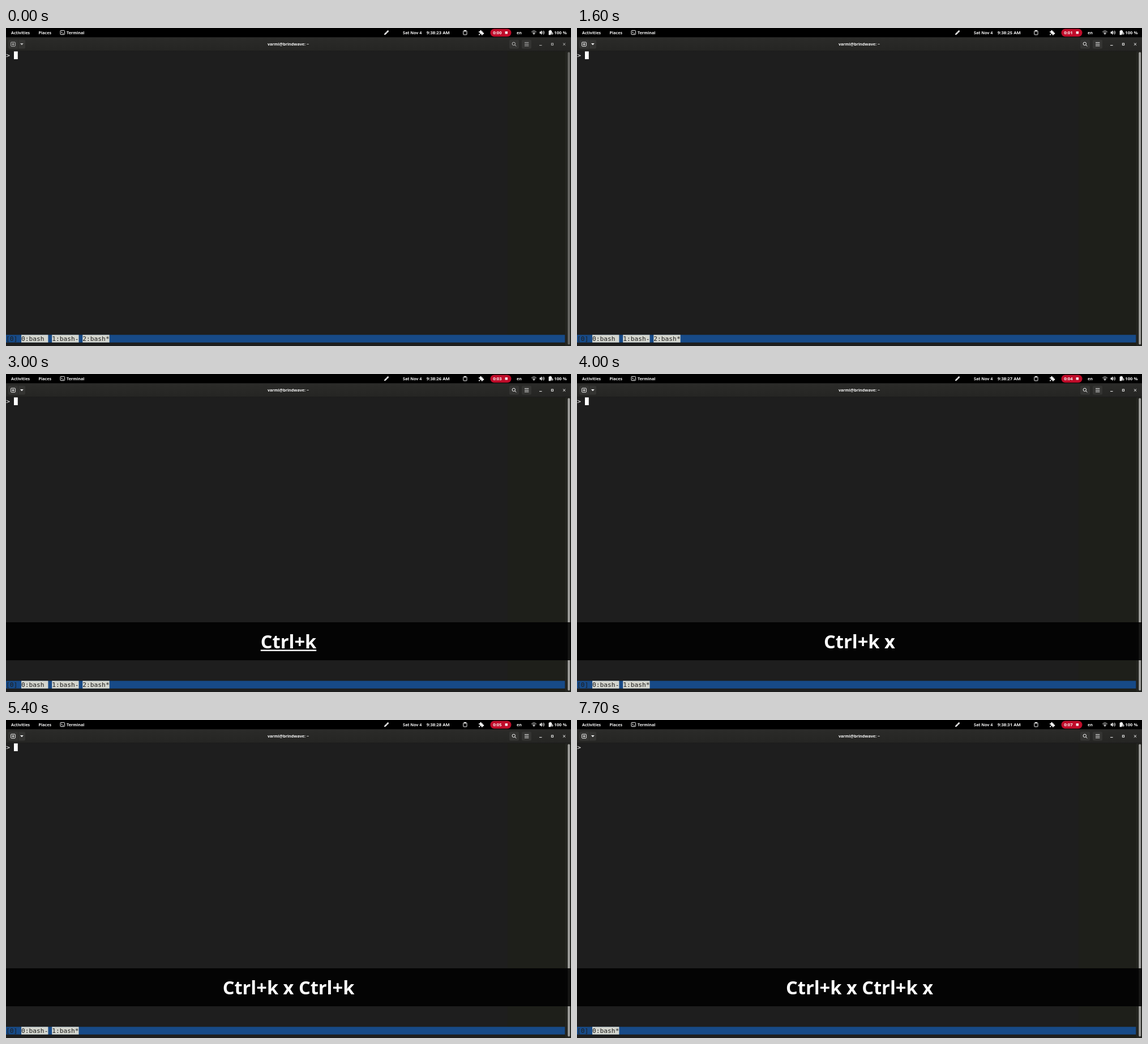
An HTML page that plays this animation: 998x561 px, repeating every 7900 ms.

```html
<!DOCTYPE html>
<html lang="en">
<head>
<meta charset="utf-8">
<title>Terminal session</title>
<style>
  html, body { margin: 0; width: 100%; height: 100%; overflow: hidden; background: #1e1e1e; }
  svg { display: block; width: 998px; height: 561px; }
  text { white-space: pre; }
  .ui { font: 600 7.15px "Noto Sans", "Open Sans", sans-serif; fill: #f4f4f4; }
  .digits { font-size: 7.7px; }
  .mono { font: 11.24px "DejaVu Sans Mono", monospace; }
  .keys { font: 700 32.6px "Noto Sans", "Open Sans", sans-serif; fill: #fff; text-anchor: middle; }
  .line { fill: none; stroke: #f4f4f4; stroke-width: 1; }
  .solid { fill: #f4f4f4; }
</style>
</head>
<body>
<svg viewBox="0 0 998 561">
  <defs>
    <linearGradient id="headerFill" x2="0" y2="1">
      <stop stop-color="#2b2b29"/><stop offset="1" stop-color="#252523"/>
    </linearGradient>
  </defs>

  <!-- Terminal body -->
  <rect width="998" height="561" fill="#1e1e1e"/>
  <rect x="886" y="41" width="112" height="520" fill="#1e1f1a"/>
  <rect x="988" y="41" width="10" height="520" fill="#242521"/>
  <rect id="thumb" x="992.3" y="42.5" width="3.8" height="516" rx="1.9"/>
  <text class="mono" x="0.3" y="52" fill="#fff">&gt;</text>
  <rect id="cursor" x="14" y="41.3" width="6.8" height="13.7" fill="#fff"/>

  <!-- Status line -->
  <rect y="541.3" width="987.3" height="13.5" fill="#174a87"/>
  <text class="mono" x="0" y="552" fill="#1e1e1e">[0]</text>
  <g id="windows"></g>

  <!-- Top panel -->
  <rect width="998" height="16.5"/>
  <g class="ui">
    <text x="9" y="10.6">Activities</text>
    <text x="57.6" y="10.6">Places</text>
    <text x="107" y="10.6">Terminal</text>
    <text x="701" y="10.6">Sat Nov 4</text>
    <text id="clock" class="digits" x="742.8" y="10.8"></text>
    <text x="902" y="10.6">en</text>
    <text class="digits" x="968.3" y="10.8">100 %</text>
  </g>
  <rect x="96" y="4.4" width="7.6" height="7.2" rx="1" class="line"/>
  <path class="line" stroke-width=".8" d="M97.7 6.4l1.5 1.4-1.5 1.4M100 9.7h2"/>
  <path class="line" stroke-width="1.4" d="M668.6 11.7l.5-1.6 3-3M672 6l2.3 2.3"/>
  <path class="solid" d="M671.8 6.5l1.9-1.9q1.2-.9 2 0t0 2l-1.9 1.9zM668 12.2l.8-2.5 2.8-2.8 1.8 1.8-2.8 2.8z"/>
  <rect class="line" x="807.8" y="5" width="6.2" height="6.9" rx=".8"/>
  <rect class="solid" x="809.2" y="3.7" width="3.4" height="2.6" rx=".6"/>
  <path class="solid" d="M835 6h2.2a1.5 1.5 0 1 1 2.8 0H842v2.2a1.5 1.5 0 1 1 0 2.6V12.4h-2.4a1.4 1.4 0 1 0-2.4 0H835v-2a1.5 1.5 0 1 0 0-2.5z"/>
  <rect x="855.5" y="1.6" width="37" height="13.6" rx="6.8" fill="#c00c2a"/>
  <text id="timer" class="ui digits" x="860.2" y="10.8"></text>
  <rect class="solid" x="881.6" y="6" width="4.4" height="4.4"/>
  <path class="line" d="M928.3 7q4.2-3.8 8.4 0M929.8 8.8q2.7-2.4 5.4 0"/>
  <path class="solid" d="M930.8 9.7q1.7-1.4 3.4 0l-1.7 2z"/>
  <path class="solid" d="M942.6 6.6h1.8l2.2-2.3v7.6l-2.2-2.2h-1.8z"/>
  <path class="line" d="M947.9 6.2q1.3 1.9 0 3.8M949.5 4.7q2.5 3.4 0 6.8"/>
  <path class="solid" d="M958.6 4.8h1.5V3.7h2.6v1.1h1.5V8l-1.8 2v2.2h-3.8z"/>
  <path class="line" d="M963 9.2h3v1.4q-1.5 1.5-3 0zM963.7 9V7.6M965.3 9V7.6"/>

  <!-- Window header -->
  <rect y="16.5" width="998" height="24.5" fill="url(#headerFill)"/>
  <rect y="40.2" width="998" height=".8" fill="#1a1a19"/>
  <g fill="#343432">
    <rect x="4" y="20.5" width="30" height="16" rx="2.5"/>
    <rect x="889" y="20.5" width="17" height="16" rx="2.5"/>
    <rect x="911" y="20.5" width="17" height="16" rx="2.5"/>
  </g>
  <path d="M21.5 20.5v16" stroke="#282826"/>
  <text class="ui" x="498.5" y="31.1" text-anchor="middle">varmi@brindwave: ~</text>
  <g id="headerIcons">
    <rect class="line" x="8.7" y="25" width="7.6" height="7.2" rx="1"/>
    <path class="line" d="M10.3 28.6h4.4M12.5 26.4v4.4"/>
    <path class="solid" d="M25 27h5.8l-2.9 3.3z"/>
    <circle class="line" cx="896.8" cy="27.8" r="2.7"/>
    <path class="line" stroke-width="1.3" d="M898.8 29.8l2.5 2.5"/>
    <path class="line" d="M916 25.6h7.4M916 28.5h7.4M916 31.4h7.4"/>
    <path class="line" stroke-width="1.2" d="M942 30.6h4.6"/>
    <rect class="line" x="963.4" y="27" width="3.2" height="3.2"/>
    <path class="line" stroke-width="1.2" d="M983.9 26.5l4.2 4.2M988.1 26.5l-4.2 4.2"/>
  </g>

  <!-- Keystroke overlay -->
  <g id="overlay">
    <rect y="438" width="998" height="67" fill="#000" fill-opacity=".86"/>
    <text id="keys" class="keys" x="499" y="483.8"></text>
    <rect id="underline" y="486.4" height="2.4" fill="#fff"/>
  </g>
</svg>
<script>
const LOOP = 7900;
const CELL = 6.765;
const $ = id => document.getElementById(id);

// Each track lists [start time, value]; a value holds until the next one.
const cursorTrack = [
  [0, true], [700, false], [1100, true], [2300, false], [2900, true], [3600, false],
  [3700, true], [4300, false], [4900, true], [6200, false], [6800, true], [7600, false]
];
const windowTrack = [
  [0, ["0:bash ", "1:bash-", "2:bash*"]],
  [3700, ["0:bash-", "1:bash*"]],
  [5700, ["0:bash*"]]
];
const keyPresses = [[3000, "Ctrl+k"], [3800, "x"], [5200, "Ctrl+k"], [5700, "x"]];
const UNDERLINE_MS = 200;

const valueAt = (track, t) => track.filter(([start]) => start <= t).pop()[1];
const clamp = v => Math.max(0, Math.min(1, v));

let shownWindows;
function drawWindows(names) {
  if (names === shownWindows) return;
  shownWindows = names;
  $("windows").innerHTML = names.map((name, i) => {
    const x = (4 + 8 * i) * CELL;
    return `<rect x="${x}" y="541.3" width="${7 * CELL}" height="13.5" fill="#d3d5ce"/>
      <text class="mono" x="${x}" y="552" fill="#1e1e1e">${name}</text>`;
  }).join("");
}

function drawKeys(t) {
  const pressed = keyPresses.filter(([start]) => start <= t);
  $("overlay").style.display = pressed.length ? "" : "none";
  if (!pressed.length) return;
  const label = $("keys");
  const text = pressed.map(([, key]) => key).join(" ");
  if (label.textContent !== text) label.textContent = text;

  const [start, key] = pressed[pressed.length - 1];
  const fresh = t < start + UNDERLINE_MS;
  const underline = $("underline");
  underline.style.display = fresh ? "" : "none";
  if (fresh) {
    const width = label.getSubStringLength(text.length - key.length, key.length);
    underline.setAttribute("x", 499 + label.getComputedTextLength() / 2 - width);
    underline.setAttribute("width", width);
  }
}

function draw(t) {
  const seconds = 23 + (t < 700 ? 0 : Math.floor((t + 400) / 1000));
  $("clock").textContent = `9:38:${seconds} AM`;
  $("timer").textContent = `0:0${Math.floor((t + 100) / 1000)}`;
  $("cursor").style.display = valueAt(cursorTrack, t) ? "" : "none";
  drawWindows(valueAt(windowTrack, t));
  drawKeys(t);

  // The window gains focus at the start of the loop.
  const grey = Math.round(104 + 58 * clamp(Math.floor(t / 100) / 4));
  $("thumb").setAttribute("fill", `rgb(${grey},${grey},${grey - 3})`);
  $("headerIcons").setAttribute("opacity", 0.72 + 0.28 * clamp(Math.floor(t / 100) / 2));
}

const began = performance.now();
function tick() {
  draw((performance.now() - began) % LOOP);
  requestAnimationFrame(tick);
}
tick();
</script>
</body>
</html>
```
